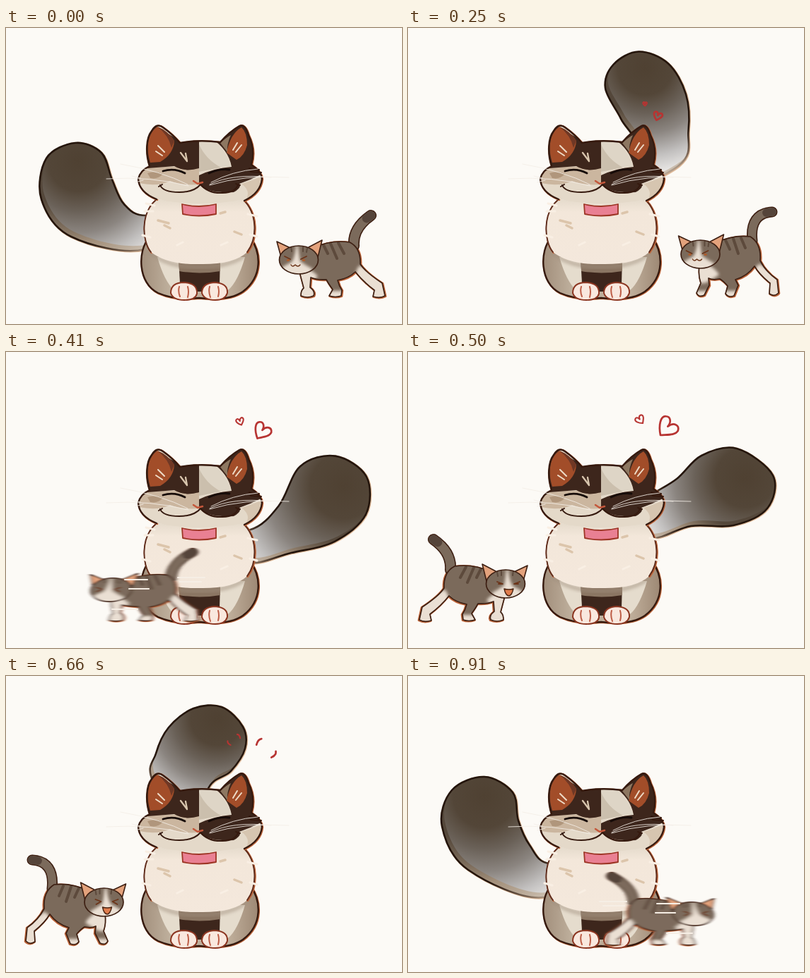
Animation, 560 px wide and 420 px high, one loop 1000 ms. Source, as an HTML page:

```html
<!DOCTYPE html>
<html lang="en">
<head>
<meta charset="utf-8">
<title>Two cats</title>
<style>
  html, body { margin: 0; width: 100%; height: 100%; overflow: hidden; background: #fcfaf6; }
  svg { display: block; width: 100vw; height: 100vh; }
  path, ellipse { stroke-linecap: round; stroke-linejoin: round; }
  .line { fill: none; stroke: #35190e; stroke-width: 2.4; }
  .glow { fill: none; stroke: #bd653a; stroke-width: 3; transform: translate(.8px, .6px); }
  .thin { fill: none; stroke: #3d1f12; stroke-width: 1.7; }
  .dark { fill: #3d261c; }
  .tuft { fill: none; stroke: #f9efe4; stroke-width: 3; }
  .tan { fill: none; stroke: #dcc5ab; stroke-width: 3.4; }
  .whisker { fill: none; stroke: #f4eee7; stroke-width: 1; opacity: .85; }
  .fur { fill: #7b6a5b; }
  .pale { fill: #eadfd3; }
  .stripe { fill: none; stroke: #5d4a3c; stroke-width: 4; }
  .eye { fill: none; stroke: #6b3419; stroke-width: 1.8; }
  .heart { fill: none; stroke: #b73432; }
</style>
</head>
<body>
<svg viewBox="0 0 560 420">
  <defs>
    <radialGradient id="tailFill" gradientUnits="userSpaceOnUse">
      <stop offset="0" stop-color="#4f4132"/>
      <stop offset=".25" stop-color="#534638"/>
      <stop offset=".42" stop-color="#6a6158"/>
      <stop offset=".6" stop-color="#8b8580"/>
      <stop offset=".8" stop-color="#c2c0bf"/>
      <stop offset="1" stop-color="#f3f1ef"/>
    </radialGradient>
    <radialGradient id="tailRim" gradientUnits="userSpaceOnUse">
      <stop offset=".38" stop-color="#54473a"/>
      <stop offset=".65" stop-color="#a4917c"/>
      <stop offset="1" stop-color="#d8cdc0"/>
    </radialGradient>
    <radialGradient id="tailLine" gradientUnits="userSpaceOnUse">
      <stop offset=".65" stop-color="#24150c"/>
      <stop offset=".85" stop-color="#7d6857"/>
      <stop offset="1" stop-color="#c9b8a6" stop-opacity=".5"/>
    </radialGradient>
    <linearGradient id="haunch" x1="0" x2="1">
      <stop offset="0" stop-color="#a28f7c"/>
      <stop offset=".25" stop-color="#bfb09d"/>
      <stop offset=".75" stop-color="#bfae9a"/>
      <stop offset="1" stop-color="#9d8874"/>
    </linearGradient>
    <linearGradient id="chest" x1="0" y1="0" x2="0" y2="1">
      <stop offset="0" stop-color="#e5dbcc"/>
      <stop offset=".2" stop-color="#f3e7da"/>
      <stop offset="1" stop-color="#f4e8dc"/>
    </linearGradient>
    <filter id="speed" x="-20%" y="-10%" width="140%" height="120%"><feGaussianBlur stdDeviation="2.6 .4"/></filter>
    <filter id="soft"><feGaussianBlur stdDeviation="2"/></filter>

    <path id="skull" d="M213 243Q188 233 187 214Q190 202 203 196C197 178 198 156 206 146Q213 134 222 141Q236 151 246 163Q273 158 303 162Q316 147 330 139Q338 135 343 152Q353 172 347 194Q361 203 362 214Q360 234 337 245"/>
    <path id="hips" d="M202 298C186 316 186 362 215 376Q240 387 273 383Q315 388 335 374C364 352 360 318 346 298Z"/>
    <path id="bust" d="M213 243C190 262 192 302 205 318Q228 336 273 335Q322 336 341 318C356 298 355 264 337 245Z"/>
    <path id="bustSides" d="M213 243C190 262 192 302 205 318M341 318C356 298 355 264 337 245"/>
    <path id="heartShape" pathLength="100" d="M0 0C-10-8-15-18-10-22C-5-26 0-21 0-14C2-23 10-25 13-18C14-11 6-6 0 0"/>
    <path id="tailShape"/>
    <clipPath id="tailClip"><use href="#tailShape"/></clipPath>
    <clipPath id="skullClip"><use href="#skull"/></clipPath>
    <clipPath id="hipsClip"><use href="#hips"/></clipPath>

    <path id="bodyA" d="M434 312Q460 300 486 304Q502 312 501 335Q508 346 532 362L536 380Q529 384 519 381L521 372Q505 360 494 346Q485 355 469 358Q471 366 475 372L474 380Q466 383 457 380L462 371Q456 363 453 357Q440 358 431 354L430 368Q438 374 435 380Q426 384 417 380Q417 372 421 369L416 350Q415 330 434 312Z"/>
    <path id="bodyB" d="M434 305Q460 293 484 296Q500 306 498 330Q506 346 522 357L524 376Q518 382 511 377L512 362Q497 350 490 338Q480 352 463 357L467 365L461 380Q453 383 449 377L452 366Q446 359 441 356Q430 358 425 355L426 365L419 379Q411 383 408 376L414 362Q410 350 412 338Q415 320 434 305Z"/>
    <clipPath id="clipA"><use href="#bodyA"/></clipPath>
    <clipPath id="clipB"><use href="#bodyB"/></clipPath>
    <clipPath id="headClip"><ellipse cx="414" cy="329" rx="27.5" ry="20"/></clipPath>

    <g id="head">
      <path d="M389 325L383 303L402 312M428 311L447 301L441 325" fill="#e3a27c" stroke="#3d1f12" stroke-width="1.6"/>
      <ellipse class="fur" cx="414" cy="329" rx="27.5" ry="20"/>
      <g clip-path="url(#headClip)">
        <path class="pale" d="M410 309Q409 324 404 332Q396 336 388 341L398 352H428L434 342Q424 337 416 331Q414 320 413 309Z" filter="url(#soft)"/>
        <path class="stripe" style="stroke-width:2" d="M403 310L404 317M420 309L420 317M426 312L425 318"/>
      </g>
      <ellipse class="thin" cx="414" cy="329" rx="27.5" ry="20"/>
    </g>
    <g id="smug">
      <path class="eye" d="M394 324L402 328M425 324L417 328"/>
      <path class="eye" style="stroke:#b25b27;stroke-width:2.5" d="M398 329.5H400M420 329.5H422"/>
      <path class="eye" style="stroke-width:1.4" d="M403 336Q405 340 409 336Q413 340 416 336"/>
    </g>
    <path id="yell" d="M403 336Q409 338 416 336Q414 346 409 346Q405 345 403 336Z" fill="#e07d4d" stroke="#4a2412" stroke-width="1.4"/>
    <path id="squint" class="eye" d="M394 325L402 328L395 332M426 325L418 328L425 332"/>
    <path id="peek" class="eye" d="M394 326L402 329H396M426 326L418 329H424"/>
    <g id="poseA">
      <use href="#bodyA" class="glow"/>
      <path d="M492 309Q490 284 516 266" fill="none" stroke="#3d1f12" stroke-width="16"/>
      <path d="M492 309Q490 284 516 266" fill="none" stroke="#7b6a5b" stroke-width="12.8"/>
      <path d="M510 270L516 266" fill="none" stroke="#55443a" stroke-width="12.8"/>
      <use href="#bodyA" class="fur"/>
      <g clip-path="url(#clipA)">
        <path class="pale" d="M410 338Q430 340 441 352L436 358V366L438 388H410ZM455 373H480V386H452ZM494 350Q498 334 503 338L545 365L540 390H510Z" filter="url(#soft)"/>
        <path class="stripe" d="M449 308L455 320M459 306L468 327M470 305L478 320"/>
      </g>
      <use href="#bodyA" class="thin"/>
    </g>
    <g id="poseB">
      <use href="#bodyB" class="glow"/>
      <path d="M487 302C484 276 494 262 515 261" fill="none" stroke="#3d1f12" stroke-width="15"/>
      <path d="M487 302C484 276 494 262 515 261" fill="none" stroke="#7b6a5b" stroke-width="11.8"/>
      <path d="M507 262L515 261" fill="none" stroke="#55443a" stroke-width="11.8"/>
      <use href="#bodyB" class="fur"/>
      <g clip-path="url(#clipB)">
        <path class="pale" d="M408 332Q430 334 440 350L428 358L420 362H405ZM406 373H425V385H404ZM446 373H470V385H444ZM490 344Q496 330 502 338L530 352V385H506Z" filter="url(#soft)"/>
        <path class="stripe" d="M449 301L455 314M460 299L467 320M471 298L477 312"/>
      </g>
      <use href="#bodyB" class="thin"/>
    </g>
  </defs>

  <rect width="560" height="420" fill="#fcfaf6"/>

  <use href="#tailShape" fill="none" stroke="#d7a67c" stroke-width="3.4" transform="translate(.8 .6)" opacity=".75"/>
  <g clip-path="url(#tailClip)">
    <use href="#tailShape" fill="url(#tailRim)"/>
    <use href="#tailShape" fill="url(#tailFill)" transform="translate(4 -7)"/>
  </g>
  <use href="#tailShape" fill="none" stroke="url(#tailLine)" stroke-width="2.6"/>

  <!-- big cat -->
  <use href="#hips" class="glow"/>
  <use href="#hips" fill="url(#haunch)"/>
  <g clip-path="url(#hipsClip)">
    <path d="M214 325Q224 360 238 372L250 366L245 325ZM338 325Q328 360 314 372L298 366L302 325Z" fill="#e5dccd"/>
    <path class="dark" d="M244 325H303L302 364L278 374H267L246 362Z"/>
    <path d="M244 325H303V345Q273 350 245 345Z" fill="#8b7663"/>
  </g>
  <use href="#hips" class="line"/>
  <path d="M203 318Q230 340 273 339Q320 339 344 318" fill="none" stroke="#9f8d7b" stroke-width="6" opacity=".5" filter="url(#soft)"/>
  <g fill="#f9e8de" stroke="#8b3520" stroke-width="2">
    <path d="M233 376Q233 361 252 361Q271 362 270 377Q268 386 252 386Q236 386 233 376ZM277 376Q277 362 295 361Q314 362 313 376Q310 386 296 386Q280 386 277 376Z"/>
    <path d="M245 367Q243 374 246 381M257 367Q259 374 257 382M288 367Q286 374 289 382M300 367Q302 374 300 381" fill="none" stroke="#bd5d46"/>
  </g>
  <use href="#bustSides" class="glow"/>
  <use href="#bust" fill="url(#chest)"/>
  <use href="#bustSides" class="line" style="stroke:#5e2b1b;stroke-width:1.9"/>
  <path class="tuft" d="M198 249L210 252M196 260L208 260M193 294L204 297M342 264L355 267M345 293L355 296M242 308L250 304M304 308L313 304M250 244H260"/>
  <path class="tan" d="M215 273L230 277M224 280L232 284M303 263L310 261M323 289L333 293"/>
  <path d="M249 250Q273 256 297 250V264Q273 269 250 264Z" fill="#e98093" stroke="#9d3525" stroke-width="1.8"/>

  <use href="#skull" class="glow"/>
  <use href="#skull" fill="#e4d9c9"/>
  <ellipse cx="275" cy="240" rx="60" ry="9" fill="#e4d9c9"/>
  <g clip-path="url(#skullClip)">
    <path d="M180 198L273 196V222Q250 224 232 217Q212 227 180 218Z" fill="#cbb69f"/>
    <path d="M200 206Q212 202 222 207Q215 215 204 213Z" fill="#b0967c"/>
    <path class="dark" d="M196 130L246 160L273 156V199Q253 205 238 196L200 199Z"/>
    <path d="M273 158H290Q313 174 318 198Q294 195 273 202Z" fill="#ded5c6"/>
    <path d="M273 165Q282 186 304 198L273 204Z" fill="#cbbfad"/>
    <path class="dark" d="M290 156Q315 173 319 197Q294 199 273 209V222Q286 235 322 233Q334 226 330 221Q350 214 370 203L352 130Z"/>
    <path d="M333 221Q352 216 364 208L360 236L338 246Q348 232 333 221Z" fill="#d6c5b0"/>
    <path d="M204 191C197 170 201 148 214 140Q229 146 238 160Q237 179 218 190Z" fill="#a24d29"/>
    <path d="M214 140Q229 146 238 160L234 170Q230 152 214 140Z" fill="#6f3825"/>
    <path d="M312 177Q317 150 333 141Q341 148 341 166Q337 182 326 187Z" fill="#a24d29"/>
    <path d="M303 163Q312 155 318 152Q312 165 313 176Z" fill="#8d7761"/>
  </g>
  <path class="tan" style="stroke:#eedbc7;stroke-width:2" d="M212 175L221 181M215 167L224 176M327 163L321 173M333 166L325 176"/>
  <path class="tan" style="stroke:#d8c5ad;stroke-width:2.3" d="M247 177L256 189L254 178"/>
  <use href="#skull" class="line"/>
  <path class="line" style="stroke:#160b08;stroke-width:2.8" d="M222 203Q238 198 253 206M287 206Q302 199 316 201"/>
  <path class="line" style="stroke-width:2" d="M218 223Q222 233 245 233Q266 233 275 222Q286 235 306 234Q326 233 328 222M216 225L221 222M325 221L331 223"/>
  <path d="M265 217L271 221L278 219" fill="none" stroke="#c4573b" stroke-width="2.5"/>
  <path class="line" style="stroke-width:2" d="M344 199L358 201M346 204L361 205"/>
  <path class="whisker" d="M162 193Q220 203 257 222M142 214Q205 210 258 224M178 210L190 213M183 219L194 216M288 222Q320 206 375 212M288 223Q336 208 400 212M290 219Q320 203 356 200"/>

  <use id="heartBig" class="heart" href="#heartShape"/>
  <use id="heartSmall" class="heart" href="#heartShape"/>

  <!-- kitten -->
  <g id="kitten">
    <g id="standing">
      <use href="#poseA"/><use href="#head"/>
      <use class="right" href="#smug"/>
      <g class="left"><use href="#yell"/><use href="#peek"/></g>
    </g>
    <g id="stepping">
      <use href="#poseB"/>
      <g transform="translate(-.5 -8)">
        <use href="#head"/>
        <use class="right" href="#smug"/>
        <g class="left"><use href="#yell"/><use href="#squint"/></g>
      </g>
    </g>
    <g id="dashing">
      <g filter="url(#speed)">
        <g transform="translate(-247 61.1) skewX(-8) scale(1.05 .84)">
          <use href="#poseA"/><use href="#head"/><use href="#squint"/>
        </g>
      </g>
      <path d="M243 320H281M246 326H276M168 323H200M174 336H202M150 365H186" fill="none" stroke="#f6eee5" stroke-width="2.2"/>
    </g>
  </g>
</svg>
<script>
const $ = id => document.getElementById(id);
const CX = 273, CY = 250, STEPS = 24;

// Tail outlines, from the clockwise base around the tip to the other base.
const low = [[198,266],[167,250],[150,215],[135,177],[98,163],[57,185],[50,243],[92,296],[196,314]];
const lag = [[295,162],[280,128],[253,97],[210,76],[160,75],[115,100],[116,150],[150,180],[202,185]];
const rise = [[352,307],[415,280],[467,230],[487,170],[465,118],[427,108],[387,135],[378,210],[342,265]];
const out = [[342,265],[400,247],[460,246],[508,222],[516,175],[465,137],[415,147],[380,180],[340,205]];
const high = [[285,162],[318,135],[338,103],[335,72],[305,44],[265,46],[230,73],[212,110],[208,150]];
const back = [[222,140],[225,110],[218,75],[190,54],[150,58],[118,98],[107,160],[130,240],[200,310]];
const settle = [[200,266],[172,240],[156,205],[148,165],[108,143],[62,162],[48,213],[85,275],[192,314]];
const over = high.map(([x, y]) => [548 - x, y - 10]).reverse();

const polar = ([x, y]) => [Math.atan2(x - CX, CY - y), Math.hypot(x - CX, y - CY)];
const keys = [[0, low], [3, lag], [5, over], [8, rise], [12, out], [16, high], [18, back], [22, settle]]
  .map(([n, pts]) => ({ n, pts: pts.map(polar) }));

function keyAt(i) {
  const turn = Math.floor(i / keys.length), k = keys[i - turn * keys.length];
  return { n: k.n + turn * STEPS, pts: k.pts };
}

// Cubic Hermite interpolation through the cyclic keys.
function tailPoints(n) {
  let i = keys.length - 1;
  while (keys[i].n > n) i--;
  const [a, b, c, d] = [-1, 0, 1, 2].map(o => keyAt(i + o));
  const h = c.n - b.n, u = (n - b.n) / h, u2 = u * u, u3 = u2 * u;
  return b.pts.map((p, j) => {
    const [ang, r] = p.map((v, q) => {
      const w = c.pts[j][q];
      const m0 = (w - a.pts[j][q]) / (c.n - a.n) * h;
      const m1 = (d.pts[j][q] - v) / (d.n - b.n) * h;
      return (2 * u3 - 3 * u2 + 1) * v + (u3 - 2 * u2 + u) * m0 + (3 * u2 - 2 * u3) * w + (u3 - u2) * m1;
    });
    return [CX + r * Math.sin(ang), CY - r * Math.cos(ang)];
  });
}

// Catmull-Rom curve as Bezier segments.
function smooth(p) {
  const f = v => v.toFixed(1);
  let d = `M${p[0].map(f)}`;
  for (let i = 0; i < p.length - 1; i++) {
    const a = p[i - 1] || p[i], b = p[i], c = p[i + 1], e = p[i + 2] || c;
    const from = [0, 1].map(q => f(b[q] + (c[q] - a[q]) / 6));
    const to = [0, 1].map(q => f(c[q] - (e[q] - b[q]) / 6));
    d += `C${from} ${to} ${c.map(f)}`;
  }
  return d;
}

function drawTail(n) {
  const pts = tailPoints(n), root = [CX, CY], tip = pts.slice(2, 7);
  $('tailShape').setAttribute('d', smooth([root, ...pts, root]));
  const [cx, cy] = [0, 1].map(q => tip.reduce((s, p) => s + p[q], 0) / tip.length);
  const reach = Math.max(...[pts[0], pts[8]].map(([x, y]) => Math.hypot(x - cx, y - cy)));
  const r = Math.max(150, reach * 1.1);
  for (const id of ['tailFill', 'tailRim', 'tailLine'])
    for (const [name, v] of Object.entries({ cx, cy, r })) $(id).setAttribute(name, v);
}

// Rows: step, x, y, angle, scale.
const bigPath = [[3, 347, 136, 10, .06], [8, 354, 127, 22, .78], [12, 357, 118, 40, 1.15], [19, 353, 118, 38, 1.3]];
const smallPath = [[3, 337, 117, 0, .03], [8, 334, 106, -5, .36], [12, 332, 101, -38, .5], [19, 328, 100, -38, .95]];

function drawHeart(el, path, n, width) {
  const shown = n >= 3 && n < 19;
  el.style.display = shown ? '' : 'none';
  if (!shown) return;
  let i = 0;
  while (n >= path[i + 1][0]) i++;
  const a = path[i], b = path[i + 1], u = (n - a[0]) / (b[0] - a[0]);
  const [, x, y, turn, s] = a.map((v, q) => v + (b[q] - v) * u);
  el.setAttribute('transform', `translate(${x} ${y}) rotate(${turn}) scale(${s})`);
  el.style.strokeWidth = width / s;
  // After the peak each half of the line shrinks to a dot.
  const k = n <= 12 ? 50 : 50 * ((19 - n) / 7) ** 2 + 2;
  el.style.strokeDasharray = n <= 12 ? 'none' : `${k} ${50 - k}`;
  el.style.strokeDashoffset = k / 2 - 25;
}

function show(selector, on) {
  for (const el of document.querySelectorAll(selector)) el.style.display = on ? '' : 'none';
}

function drawKitten(n) {
  const half = n % 12, left = n >= 12;
  const pose = half >= 10 ? 'dashing' : half >= 3 && half <= 6 ? 'stepping' : 'standing';
  for (const id of ['standing', 'stepping', 'dashing']) show('#' + id, id === pose);
  show('.left', left);
  show('.right', !left);
  $('kitten').setAttribute('transform', left ? 'translate(552) scale(-1 1)' : '');
}

// 24 steps per second, on a 10 ms grid; the last step of each half is held.
function stepAt(ms) {
  const n = Math.floor((Math.floor(ms / 10) * 10 + 9.99) * STEPS / 1000);
  return n % 12 === 11 ? n - 1 : n;
}

function draw(n) {
  drawTail(n);
  drawHeart($('heartBig'), bigPath, n, 2.7);
  drawHeart($('heartSmall'), smallPath, n, 2.1);
  drawKitten(n);
}

const start = performance.now();
let last = 0;
draw(0);
requestAnimationFrame(function tick(now) {
  const n = stepAt(Math.max(0, now - start) % 1000);
  if (n !== last) draw(last = n);
  requestAnimationFrame(tick);
});
</script>
</body>
</html>
```
